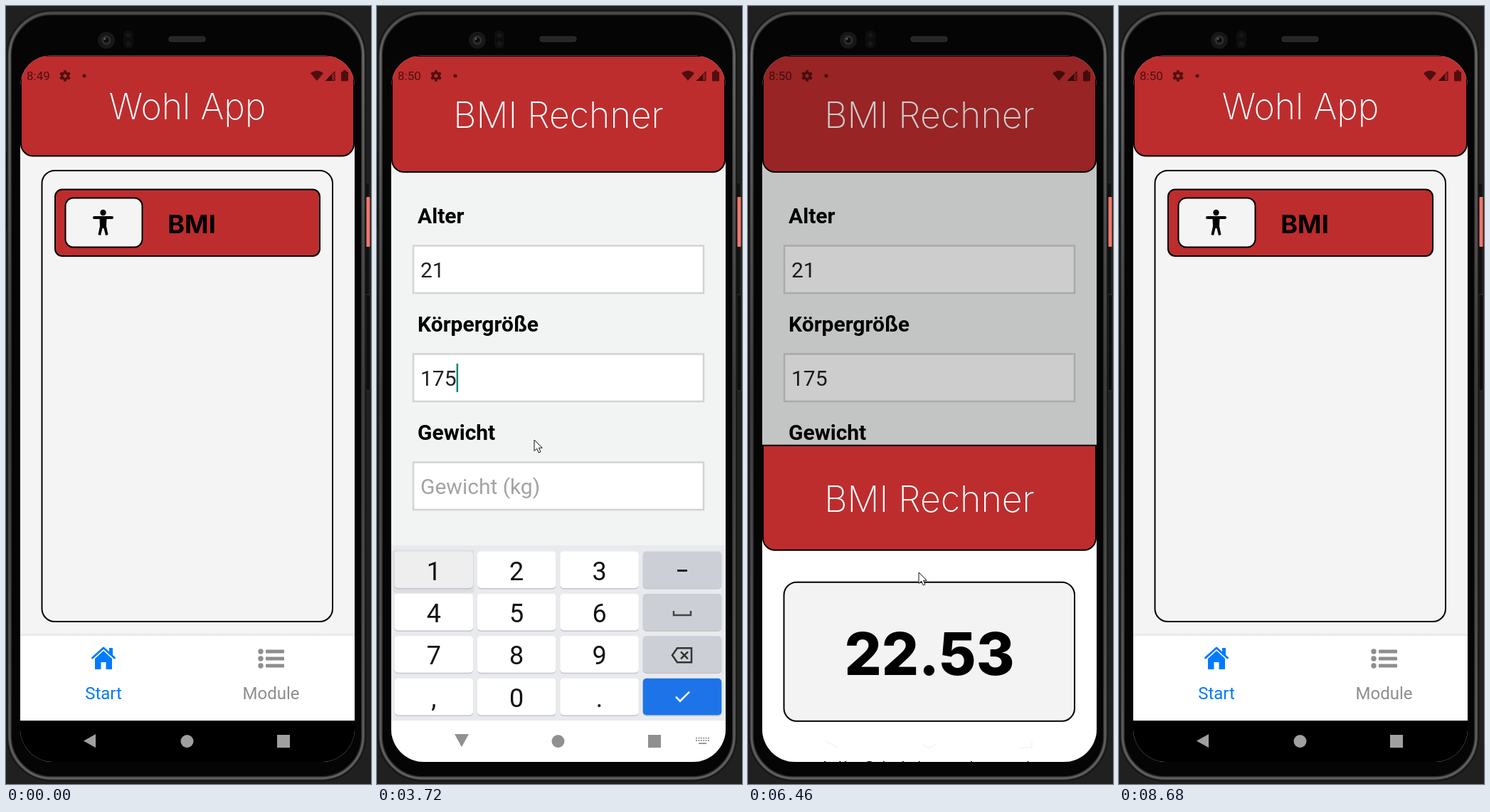
Write an HTML page with a canvas that moves like this. It is 513 by 1092 pixels and loops after 8950 ms.

```html
<!DOCTYPE html>
<html lang="de">
<head>
<meta charset="utf-8">
<title>BMI Rechner</title>
<style>
html, body { margin: 0; width: 513px; height: 1092px; overflow: hidden; background: #202020; }
canvas { display: block; }
</style>
</head>
<body>
<canvas id="stage" width="513" height="1092"></canvas>
<script>
const stage = document.getElementById('stage');
const main = stage.getContext('2d');
const buffer = document.createElement('canvas');
buffer.width = 513;
buffer.height = 1092;
const layerCtx = buffer.getContext('2d');
let g = main;

const LOOP = 8950;
const RED = '#bd2d2e';
const CENTER = { x: 255, y: 538 };
const TITLE = '200 50px Inter, sans-serif';
const PROSE = '300 33px Lato, sans-serif';
const BODY = 'Roboto, sans-serif';

// Timeline (ms)
const OPEN_FORM = 1246, CLOSE_FORM = 8240, PUSH = 400;
const KEYS_UP = [1760, 2020], KEYS_DOWN = [5410, 5570];
const SHEET_UP = [6353, 6613], SHEET_DOWN = [7800, 8110];
const SHEET_TOP = 386, SCREEN_BOTTOM = 1061;
const CLICKS = [[1020, 1150], [1650, 1740], [2660, 2760], [3940, 4040],
  [5320, 5405], [6140, 6270], [7760, 7850], [8160, 8245]];
const POINTER = [[260, 505, 1035], [960, 231, 320], [1170, 231, 320], [1450, 230, 327],
  [1640, 215, 372], [2380, 215, 372], [2640, 222, 522], [3440, 222, 522], [3720, 221, 609],
  [3930, 222, 664], [4730, 222, 664], [5250, 438, 984], [5580, 438, 984], [6090, 240, 795],
  [7000, 240, 795], [7630, 253, 925], [7755, 122, 1031], [8300, 122, 1031], [8600, 112, 1094]];
const FIELDS = [
  { label: 'Alter', hint: 'Alter', y: 336, focus: [1700, 2700], typed: [[2140, '2'], [2280, '21']] },
  { label: 'Körpergröße', hint: 'Körpergröße (cm)', y: 488, focus: [2700, 3980],
    typed: [[3040, '1'], [3440, '17'], [3580, '175']] },
  { label: 'Gewicht', hint: 'Gewicht (kg)', y: 640, focus: [3980, 5410], typed: [[4330, '6'], [4400, '69']] }
];
const RESULT = [' Mit 21 Jahren hast du', 'einen BMI von 22.53.', 'Damit bist du ', 'normalgewichtig.'];

const clamp = v => Math.max(0, Math.min(1, v));
const span = (t, [a, b]) => clamp((t - a) / (b - a));
const smooth = u => u * u * (3 - 2 * u);
const easeOut = u => 1 - (1 - u) ** 2;
const within = (t, [a, b]) => t >= a && t < b;

// Cubic bezier (0.35, 0.45, 0, 1)
function pushEase(x) {
  let lo = 0, hi = 1;
  for (let i = 0; i < 20; i++) {
    const m = (lo + hi) / 2;
    if (1.05 * (1 - m) ** 2 * m + m ** 3 < x) lo = m; else hi = m;
  }
  return 1.35 * (1 - lo) ** 2 * lo + 3 * (1 - lo) * lo * lo + lo ** 3;
}

function box(x, y, w, h, r, fill, stroke, width = 2) {
  g.beginPath();
  g.roundRect(x, y, w, h, r);
  if (fill) { g.fillStyle = fill; g.fill(); }
  if (stroke) { g.strokeStyle = stroke; g.lineWidth = width; g.stroke(); }
}

function disc(x, y, r, fill) {
  g.beginPath();
  g.arc(x, y, r, 0, 7);
  g.fillStyle = fill;
  g.fill();
}

function poly(points, fill, stroke, width = 1, close = true) {
  g.beginPath();
  points.forEach(([x, y]) => g.lineTo(x, y));
  if (close) g.closePath();
  if (fill) { g.fillStyle = fill; g.fill(); }
  if (stroke) { g.strokeStyle = stroke; g.lineWidth = width; g.stroke(); }
}

function text(str, x, y, font, color, align = 'left') {
  g.font = font;
  g.fillStyle = color;
  g.textAlign = align;
  g.fillText(str, x, y);
}

function shadowed(draw) {
  g.save();
  g.shadowColor = 'rgba(0,0,0,.35)';
  g.shadowBlur = 9;
  g.shadowOffsetY = 6;
  draw();
  g.restore();
}

function faded(alpha, draw) {
  g.save();
  g.globalAlpha *= alpha;
  draw();
  g.restore();
}

// Draws a screen as one group with scale and opacity
function layer(draw, scale, alpha) {
  if (alpha <= 0) return;
  layerCtx.clearRect(0, 0, 513, 1092);
  g = layerCtx;
  draw();
  g = main;
  g.save();
  g.beginPath();
  g.rect(20, 69, 470, 934);
  g.clip();
  g.globalAlpha = alpha;
  g.translate(CENTER.x, CENTER.y);
  g.scale(scale, scale);
  g.drawImage(buffer, -CENTER.x, -CENTER.y);
  g.restore();
}

function header(title, top, bottom, baseline) {
  box(21, top, 468, bottom - top, [0, 0, 17, 17], RED, '#000');
  text(title, 255, baseline, TITLE, '#fff', 'center');
}

function device() {
  g.fillStyle = '#202020';
  g.fillRect(0, 0, 513, 1092);
  box(-2, 205, 5, 108, 2, '#111', '#333', 1);
  box(505, 248, 6, 157, 2, '#111', '#2c2c2c', 1);
  box(506, 405, 6, 135, 2, '#0c0c0c', '#333', 1);
  box(506.5, 268, 5, 70, 1, '#f0776b');
  const rim = g.createLinearGradient(0, 6, 0, 1088);
  rim.addColorStop(0, '#4a4a4a');
  rim.addColorStop(.06, '#686868');
  rim.addColorStop(.5, '#3c3c3c');
  rim.addColorStop(1, '#606060');
  box(2, 7, 503, 1080, 62, '#1c1c1c', '#0c0c0c', 2);
  box(5, 10, 497, 1074, 59, '#050505', '#2c2c2c', 6);
  box(5, 10, 497, 1074, 59, null, rim, 3);
  disc(141, 48, 12, '#171717');
  disc(141, 48, 6.5, '#2d2f30');
  disc(141, 48, 3.5, '#0b0c0d');
  disc(139, 46, 1.5, '#5c6062');
  box(166, 35, 12, 24, 5, '#0c0c0c', '#151515', 1);
  disc(172, 41, 3.5, '#171717');
  disc(172, 53, 3.5, '#171717');
  box(229, 43, 51, 7, 3, '#262626', '#333', 1);
}

function home(t) {
  g.fillStyle = '#f4f4f4';
  g.fillRect(20, 70, 470, 933);
  header('Wohl App', 69.5, 210.5, 159);
  box(50.5, 231, 408.5, 633, 18, null, '#000');
  faded(within(t, [1040, 1190]) ? .4 : 1, () => {
    box(69, 257.5, 372, 93.5, 10, RED, '#000');
    box(83.5, 269.5, 108, 69, 11, '#f4f4f4', '#000');
    person(136.5, 304);
    text('BMI', 261, 319, '700 36px Inter, sans-serif', '#000', 'center');
  });
  const shade = g.createLinearGradient(0, 879, 0, 884);
  shade.addColorStop(0, '#f4f4f4');
  shade.addColorStop(1, '#e6e6e6');
  g.fillStyle = shade;
  g.fillRect(20, 879, 470, 5);
  g.fillStyle = '#fff';
  g.fillRect(20, 884, 470, 119);
  house(137, 915);
  text('Start', 137, 973, '24px ' + BODY, '#007aff', 'center');
  for (const y of [906, 916, 926]) {
    disc(358, y, 3.7, '#8e8e8f');
    box(365, y - 2.5, 26, 5, 1, '#8e8e8f');
  }
  text('Module', 372.5, 973, '24px ' + BODY, '#8e8e8f', 'center');
}

function person(x, y) {
  disc(x, y - 14, 4.2, '#000');
  box(x - 14.5, y - 9, 29, 4, 2, '#000');
  poly([[x - 5, y - 6], [x + 5, y - 6], [x + 4.5, y + 5], [x + 7, y + 17], [x + 3.5, y + 18],
    [x + 1, y + 8], [x - 1, y + 8], [x - 3.5, y + 18], [x - 7, y + 17], [x - 4.5, y + 5]], '#000');
}

function house(x, y) {
  g.lineCap = g.lineJoin = 'round';
  poly([[x - 15.5, y], [x, y - 14], [x + 15.5, y]], null, '#007aff', 3, false);
  g.fillStyle = '#007aff';
  g.fillRect(x + 8, y - 14, 5, 10);
  poly([[x - 12, y + 1], [x, y - 10], [x + 12, y + 1], [x + 12, y + 16], [x + 3.5, y + 16],
    [x + 3.5, y + 6], [x - 3.5, y + 6], [x - 3.5, y + 16], [x - 12, y + 16]], '#007aff');
  g.lineCap = 'butt';
  g.lineJoin = 'miter';
}

function field(f, t) {
  const baseline = f.y + 44.5;
  text(f.label, 57, f.y - 31, '700 30px ' + BODY, '#000');
  box(51, f.y + .5, 408, 66.5, 0, '#fff', '#d3d3d3', 2.5);
  const done = f.typed.filter(e => e[0] <= t);
  const value = done.length ? done[done.length - 1][1] : '';
  text(value || f.hint, 61, baseline, '30px ' + BODY, value ? '#212121' : '#a3a3a3');
  if (!within(t, f.focus)) return;
  const since = t - Math.max(f.focus[0], done.length ? done[done.length - 1][0] : 0);
  if (since % 1000 < 500) {
    g.fillStyle = '#12857b';
    g.fillRect(61 + (value ? g.measureText(value).width : 0), f.y + 14, 2.5, 40);
  }
}

function form(t) {
  g.fillStyle = '#f2f4f4';
  g.fillRect(20, 70, 470, 933);
  header('BMI Rechner', 70, 233, 171);
  FIELDS.forEach(f => field(f, t));
  faded(within(t, [6160, 6290]) ? .4 : 1, () => {
    shadowed(() => box(50, 783, 409, 70, 10, RED));
    box(50, 783, 409, 70, 10, RED, '#000');
    text('Berechnen', 255, 829, '42px ' + BODY, '#000', 'center');
  });
  shadowed(() => box(50, 901.5, 93.5, 70, 10, RED));
  box(50, 901.5, 93.5, 70, 10, RED, '#000');
  poly([[119, 936.5], [75, 936.5]], null, '#fff', 5.5, false);
  poly([[96, 915.5], [75, 936.5], [96, 957.5]], null, '#fff', 5.5, false);
}

function navBar(dark, y = 0) {
  const color = dark ? '#a0a0a0' : '#909090';
  g.fillStyle = dark ? '#000' : '#fff';
  g.fillRect(20, 1003 + y, 470, 58);
  if (dark) poly([[109, 1031.5], [126, 1022], [126, 1041]], color);
  else poly([[109, 1022 + y], [129, 1022 + y], [119, 1040 + y]], color);
  disc(254.5, 1032 + y, 9, color);
  g.fillStyle = color;
  g.fillRect(381, 1023 + y, 18, 18);
}

function keyboard(t, y) {
  g.fillStyle = '#e8eaed';
  g.fillRect(20, 757 + y, 470, 247);
  const rows = ['123–', '456 ', '789x', ',0.v'];
  rows.forEach((row, r) => [...row].forEach((key, c) => {
    const kx = 24.5 + c * 116.4, ky = 765.5 + r * 59.4 + y;
    const mx = kx + 55.3, my = ky + 26;
    let fill = c < 3 ? '#fff' : '#cdcfd6';
    if (key === '1') {
      box(kx - 3, ky - 2, 115, 60, 4, '#dcdee1');
      fill = '#eee';
    }
    if (key === 'v') fill = within(t, CLICKS[4]) ? '#165bbe' : '#1d74e8';
    box(kx, ky + 1.5, 110.6, 51.5, 5, '#c3c5ca');
    box(kx, ky, 110.6, 51.5, 5, fill);
    if (c < 3) text(key, mx, my + 14, '36px ' + BODY, '#111', 'center');
    else keyIcon(key, mx, my);
  }));
  navBar(false, y);
  for (let r = 0; r < 2; r++)
    for (let c = 0; c < 6; c++) box(448 + c * 3.4, 1026.5 + r * 3.5 + y, 2, 2, 0, '#999');
  box(452, 1034 + y, 11, 2, 0, '#999');
}

function keyIcon(key, x, y) {
  if (key === '–') box(x - 7, y - .5, 14, 3, 0, '#222');
  if (key === ' ') poly([[x - 12, y - 2], [x - 12, y + 4], [x + 12, y + 4], [x + 12, y - 2]], null, '#444', 2.5, false);
  if (key === 'x') {
    poly([[x - 14, y + 1], [x - 7, y - 9], [x + 13, y - 9], [x + 13, y + 11], [x - 7, y + 11]], null, '#333', 2.5);
    poly([[x - 2, y - 4], [x + 8, y + 6]], null, '#333', 2.5, false);
    poly([[x + 8, y - 4], [x - 2, y + 6]], null, '#333', 2.5, false);
  }
  if (key === 'v') poly([[x - 9, y], [x - 3, y + 6], [x + 10, y - 7]], null, '#fff', 2.5, false);
}

function sheet(amount) {
  if (amount <= 0) return;
  g.fillStyle = `rgba(0,0,0,${.295 * amount})`;
  g.fillRect(20, 69, 470, 992);
  const top = SCREEN_BOTTOM + (SHEET_TOP - SCREEN_BOTTOM) * amount;
  g.fillStyle = '#fff';
  g.fillRect(20, top, 470, 1092 - top);
  header('BMI Rechner', top, top + 147, top + 93);
  box(50.5, top + 192, 408.5, 195, 18, '#f3f3f3', '#000');
  text('22.53', 255, top + 322, '800 82px Inter, sans-serif', '#000', 'center');
  RESULT.forEach((line, i) => text(line, 255, top + 467 + i * 41, PROSE, '#000', 'center'));
  poly([[109, 1031.5], [126, 1041]], null, '#ececec', 1, false);
  g.beginPath();
  g.arc(254.5, 1032, 9, .3, 2.8);
  g.stroke();
  poly([[381, 1041], [399, 1041], [399, 1032]], null, '#ececec', 1, false);
}

function statusBar(t) {
  const ink = 'rgba(30,0,0,.68)';
  text(t < 2400 ? '8:49' : '8:50', 29, 104, '17px ' + BODY, ink);
  g.beginPath();
  g.arc(83, 98, 4.3, 0, 7);
  g.strokeStyle = ink;
  g.lineWidth = 3.5;
  g.stroke();
  for (let i = 0; i < 6; i++) {
    g.save();
    g.translate(83, 98);
    g.rotate(i * Math.PI / 3 + Math.PI / 6);
    g.fillStyle = ink;
    g.fillRect(5.8, -2, 2, 4);
    g.restore();
  }
  disc(110, 98, 2.6, ink);
  g.beginPath();
  g.moveTo(437, 105);
  g.lineTo(428, 94.5);
  g.quadraticCurveTo(437, 87, 446, 94.5);
  g.fillStyle = ink;
  g.fill();
  poly([[449, 105], [462.5, 91], [462.5, 105]], 'rgba(30,0,0,.3)');
  poly([[449, 105], [458, 95.5], [458, 105]], ink);
  poly([[449.5, 104.5], [462, 92], [462, 104.5]], null, ink, 1);
  box(471, 92, 10, 13.5, 1.5, ink);
  box(474, 90, 4, 2, 0, ink);
}

function pointer(t) {
  const last = POINTER[POINTER.length - 1];
  if (t < POINTER[0][0] || t >= last[0]) return;
  const i = POINTER.findIndex(k => k[0] > t);
  const [t0, x0, y0] = POINTER[i - 1], [t1, x1, y1] = POINTER[i];
  const u = smooth((t - t0) / (t1 - t0));
  const clicked = CLICKS.some(c => within(t, c));
  g.save();
  g.translate(x0 + (x1 - x0) * u, y0 + (y1 - y0) * u);
  if (clicked) disc(0, 0, 11, 'rgba(232,228,0,.5)');
  poly([[0, 0], [0, 15.5], [3.7, 12.2], [6.3, 18], [9, 16.8], [6.5, 11.2], [11.3, 11.2]],
    clicked ? '#ffff45' : '#fff', '#111', 1);
  g.restore();
}

function pushAmount(t) {
  if (t < CLOSE_FORM) return pushEase(clamp((t - OPEN_FORM) / PUSH));
  return 1 - pushEase(clamp((t - CLOSE_FORM) / PUSH));
}

function render(t) {
  g = main;
  device();
  g.save();
  g.beginPath();
  g.roundRect(20, 69.5, 470, 991.5, [43, 43, 46, 46]);
  g.clip();
  g.fillStyle = '#fff';
  g.fillRect(20, 69, 470, 992);

  const p = pushAmount(t);
  const homeAlpha = p < .2 ? 1 - p / .2 * .67 : .33 * (1 - p) / .8;
  const formAlpha = p < .8 ? p / .8 * .5 : clamp(.5 + (p - .8) / .12 * .5);
  const from = t < CLOSE_FORM ? .85 : .9;
  layer(() => home(t), 1 + .1 * p, homeAlpha);
  layer(() => form(t), from + (1 - from) * p, formAlpha);
  navBar(true);

  const keys = easeOut(span(t, KEYS_UP)) * (1 - span(t, KEYS_DOWN) ** 2);
  if (keys > 0) keyboard(t, 304 * (1 - keys));
  sheet(easeOut(span(t, SHEET_UP)) * (1 - smooth(span(t, SHEET_DOWN))));
  statusBar(t);
  g.restore();
  pointer(t);
}

const start = performance.now();
function tick() {
  render((performance.now() - start) % LOOP);
  requestAnimationFrame(tick);
}
tick();
</script>
</body>
</html>
```
